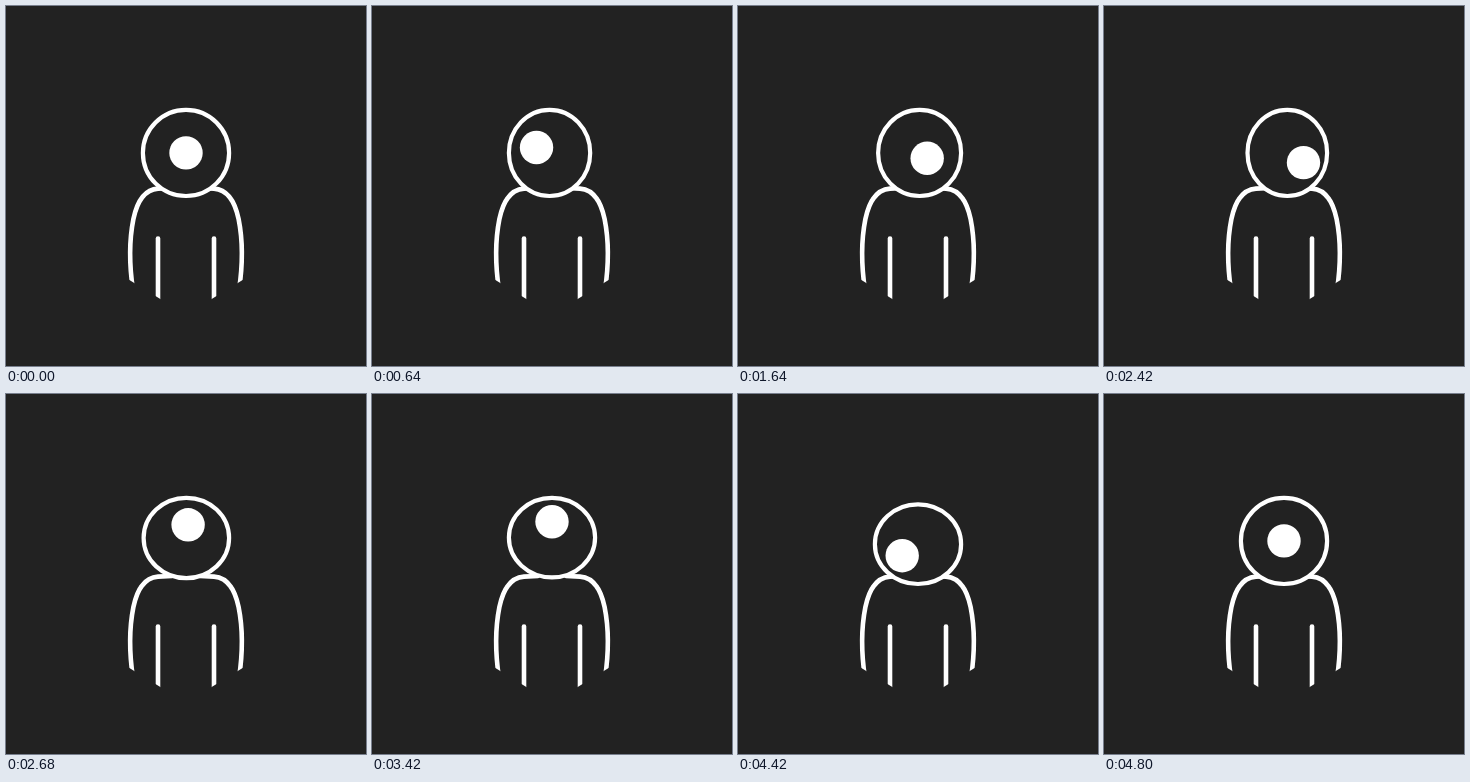
Animation, 360 px wide and 360 px high, one loop 6 s. Source, as an HTML page:

```html
<!DOCTYPE html>
<html lang="en">
<head>
<meta charset="utf-8">
<title>Looking around</title>
<style>
  html, body { margin: 0; width: 100%; height: 100%; overflow: hidden; background: #222; }
  svg { display: block; width: 100%; height: 100%; }
</style>
</head>
<body>
<svg viewBox="0 0 360 360">
  <defs>
    <clipPath id="hem"><path d="M90 0H270V253.4L180 308.8L90 253.4Z"/></clipPath>
    <g id="side" fill="none" stroke="#fff" stroke-width="4.6" stroke-linecap="round">
      <path d="M127 284C122.8 256 123.4 233 127.4 213C131.4 194 139 183.5 152 182.6L166 182"/>
      <path d="M152 232.5V300"/>
    </g>
  </defs>
  <rect width="360" height="360" fill="#222"/>
  <g clip-path="url(#hem)">
    <use href="#side"/>
    <use href="#side" transform="matrix(-1 0 0 1 360 0)"/>
  </g>
  <ellipse id="head" fill="#222" stroke="#fff" stroke-width="4.2"/>
  <circle id="pupil" r="16.7" fill="#fff"/>
</svg>
<script>
  const LOOP = 6000, STEP = 20, FIRST = 400, EVERY = 1000, MOVE = 400;
  const CENTER = { x: 180, y: 146.9 }, RADIUS = 43.1, SQUASH = 3.3;

  // Pupil offset, and the direction in which the head is squashed
  const poses = [
    { x: 0, y: 0, sx: 0, sy: 0 },
    { x: -20.8, y: -7.3, sx: -1, sy: 0 },
    { x: 19.5, y: 9.7, sx: 1, sy: 0 },
    { x: 0, y: -19.2, sx: 0, sy: -1 },
    { x: -15.8, y: 14.8, sx: 0, sy: 1 },
    { x: 0, y: 0, sx: 0, sy: 0 }
  ];

  const head = document.getElementById('head');
  const pupil = document.getElementById('pupil');
  const ease = u => u < 0.5 ? 4 * u ** 3 : 1 - 4 * (1 - u) ** 3;

  function set(el, attrs) {
    for (const name in attrs) el.setAttribute(name, attrs[name].toFixed(3));
  }

  function poseAt(time) {
    const since = time - FIRST;
    if (since < 0) return poses[0];
    const i = Math.min(Math.floor(since / EVERY), poses.length - 2);
    const p = ease(Math.min((since - i * EVERY) / MOVE, 1));
    const from = poses[i], to = poses[i + 1], pose = {};
    for (const key in from) pose[key] = from[key] + (to[key] - from[key]) * p;
    return pose;
  }

  function draw(time) {
    const { x, y, sx, sy } = poseAt(Math.floor(time % LOOP / STEP) * STEP);
    set(pupil, { cx: CENTER.x + x, cy: CENTER.y + y });
    set(head, {
      cx: CENTER.x + SQUASH * sx,
      cy: CENTER.y + SQUASH * sy,
      rx: RADIUS - SQUASH * Math.abs(sx),
      ry: RADIUS - SQUASH * Math.abs(sy)
    });
  }

  const start = performance.now();
  function tick() {
    draw(performance.now() - start);
    requestAnimationFrame(tick);
  }
  tick();
</script>
</body>
</html>
```
